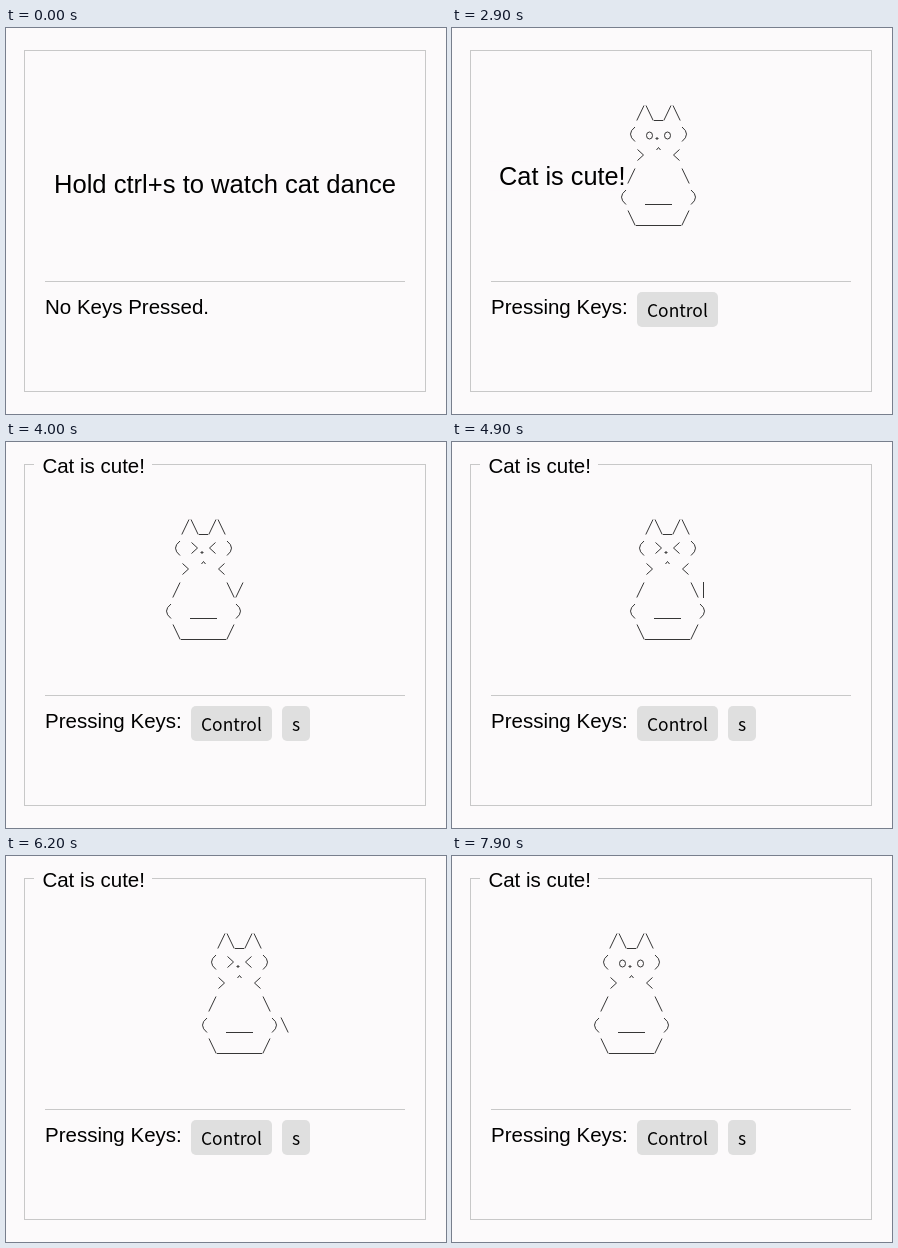
Recreate the animation shown at these times as an HTML page. Size 440 by 386 pixels, loop 8000 ms.

```html
<!DOCTYPE html>
<html lang="en">
<head>
<meta charset="utf-8">
<title>Dancing cat</title>
<style>
  html, body { margin: 0; width: 100%; height: 100%; overflow: hidden; background: #fcfafb; }
  svg { display: block; font-family: "Liberation Sans", Arial, sans-serif; }
  .line { fill: none; stroke: #c8c8c8; }
  .key rect { fill: #dfdfdf; }
  .key text { font: 17.4px "Noto Sans CJK JP", "Noto Sans CJK SC", "Noto Sans", sans-serif; }
  #cat { fill: none; stroke: #2c2c2c; stroke-width: .95; }
</style>
</head>
<body>
<svg width="440" height="386" viewBox="0 0 440 386">
  <rect class="line" x="18.5" y="22.5" width="401" height="341"/>
  <path class="line" d="M39 253.5H399"/>
  <text id="title" x="219" y="164.5" font-size="25.6" text-anchor="middle">Hold ctrl+s to watch cat dance</text>
  <g id="legend">
    <rect x="-8.4" y="-19" width="118" height="24" fill="#fcfafb"/>
    <text font-size="20.5">Cat is cute!</text>
  </g>
  <path id="cat"/>
  <text id="status" x="39" y="286" font-size="20.5"></text>
  <g class="key" id="control">
    <rect x="185" y="264" width="81" height="35" rx="5"/>
    <text x="195" y="289">Control</text>
  </g>
  <g class="key" id="s">
    <rect x="276" y="264" width="28" height="35" rx="5"/>
    <text x="286" y="289">s</text>
  </g>
</svg>
<script>
const LOOP = 8000, TICK = 100, BEAT = 150;
const KEY_DOWN = 1400, DANCE = 2900, SPRING_START = 2870, SPRING_END = 3500;
const COLUMN = 9, ROW = 21;

// Stroke for each character inside a 9 x 21 cell.
const strokes = {
  '/': 'M.8 17.5L8 2.5',
  '\\': 'M1 2.5L8.2 17.5',
  '_': 'M0 17.5h9',
  '|': 'M4.5 2v16',
  '(': 'M8 3Q-1 10 8 17.5',
  ')': 'M1 3Q10 10 1 17.5',
  '<': 'M7.5 4.5L1.5 10L7.5 15.5',
  '>': 'M1.5 4.5L7.5 10L1.5 15.5',
  '^': 'M2.5 5L4.5 2.5L6.5 5',
  'o': 'M1.5 11.5a3 3.5 0 1 0 6 0a3 3.5 0 1 0 -6 0',
  '.': 'M2 14h2v1h-2z'
};

// Each pose: columns from the left, then an optional tail.
const poses = ('3 4/ 4| 6\\ 5\\ 4| 3 2/ 1 2 3 3/ 4/ 4| 6\\ 5\\ 4| ' +
  '1 2/ 3 4/ 4| 6\\ 5\\ 4| 3 2/ 1 2 2/ 3/ 4 5 0').split(' ');

const el = id => document.getElementById(id);
const show = (id, opacity) => el(id).setAttribute('opacity', opacity);
const ramp = (t, start) => Math.min(1, Math.max(0, (t - start) / 200));

function catPath([shift, tail = '']) {
  const low = tail === '\\';
  const rows = [
    '  /\\_/\\',
    ` ( ${tail ? '>.<' : 'o.o'} )`,
    '  > ^ <',
    ' /     \\' + (low ? '' : tail),
    '(  ___  )' + (low ? tail : ''),
    ' \\_____/'
  ];
  const left = 139 + shift * COLUMN;
  return rows.map((row, r) => [...row].map((char, c) =>
    strokes[char] ? place(strokes[char], left + c * COLUMN, 75 + r * ROW) : ''
  ).join('')).join('');
}

// Offsets the absolute commands (M, L, Q) of a stroke; relative ones stay.
function place(stroke, x, y) {
  return stroke.replace(/([MLQ])([^A-Za-z]+)/g, (_, command, args) =>
    command + args.match(/-?[\d.]+/g).map((n, i) => +n + (i % 2 ? y : x)).join(' '));
}

function spring(t) {
  if (t >= SPRING_END) return 1;
  const s = (t - SPRING_START) / 1000, decay = 7.5, freq = 10.2;
  return 1 - Math.exp(-decay * s) * (Math.cos(freq * s) + decay / freq * Math.sin(freq * s));
}

function draw(t) {
  const dancing = t >= DANCE;
  show('title', dancing ? 0 : 1);
  show('legend', dancing ? 1 : 0);
  show('cat', dancing ? 1 : 0);
  show('control', ramp(t, KEY_DOWN));
  show('s', ramp(t, DANCE));
  el('status').textContent = t < KEY_DOWN ? 'No Keys Pressed.' : 'Pressing Keys:';
  if (!dancing) return;

  const p = spring(t), mix = (a, b) => a + (b - a) * p;
  el('legend').setAttribute('transform',
    `translate(${mix(47.8, 36.4)} ${mix(165, 31)}) scale(${mix(1.25, 1)})`);
  const pose = poses[Math.floor((t - DANCE) / BEAT)];
  el('cat').setAttribute('d', catPath([+pose[0], pose[1]]));
}

const start = performance.now();
function frame() {
  const t = (performance.now() - start) % LOOP;
  draw(Math.floor(t / TICK) * TICK);
  requestAnimationFrame(frame);
}
frame();
</script>
</body>
</html>
```
